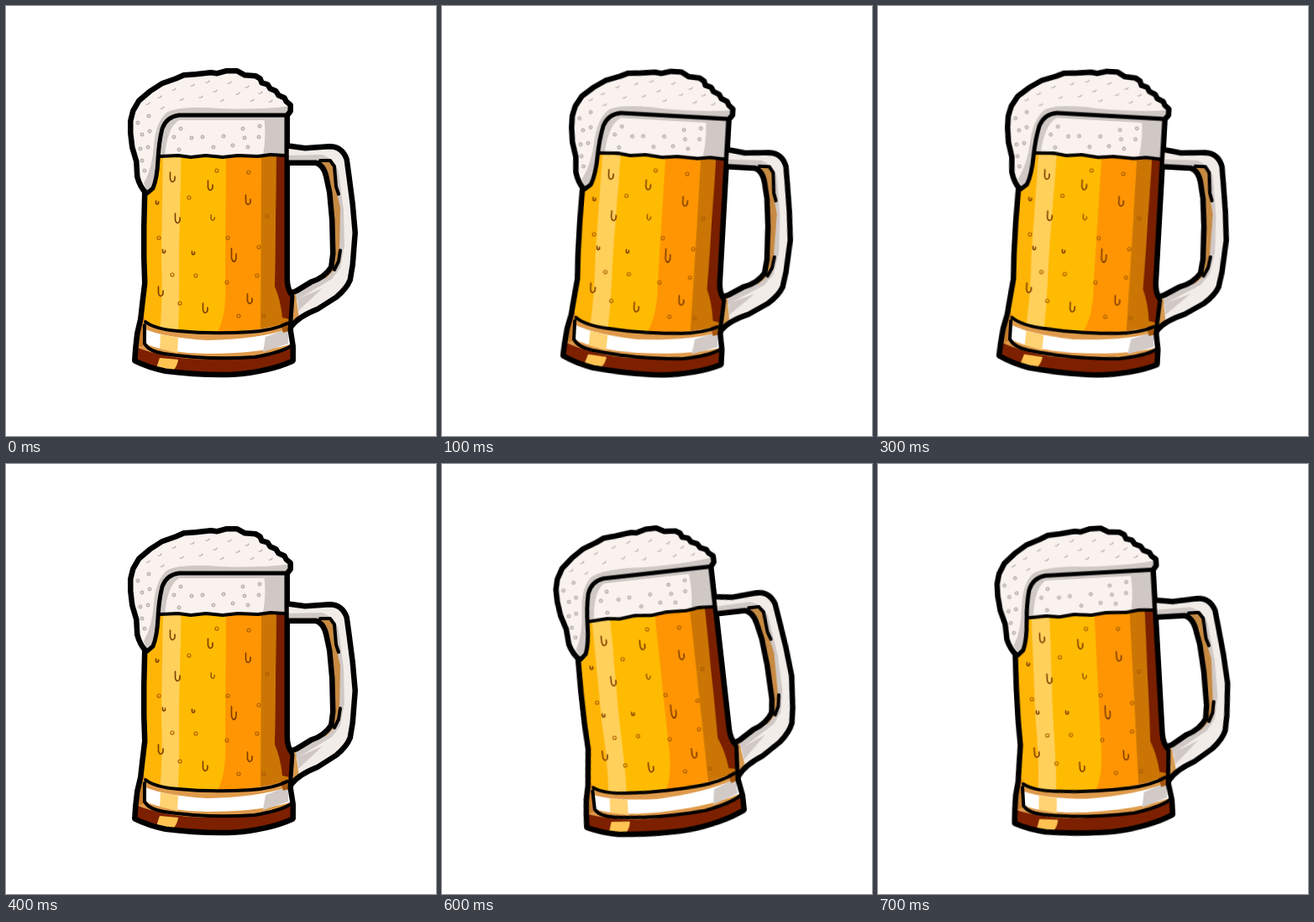
An HTML page without scripts that plays this animation: 512 px wide and 512 px high, repeating every 0.8 s.

```html
<!DOCTYPE html>
<html lang="en">
<head>
<meta charset="utf-8">
<title>Swaying beer mug</title>
<style>
html, body { margin: 0; width: 100%; height: 100%; overflow: hidden; background: #fff; }
svg { display: block; width: 100vw; height: 100vh; }
.mug { transform-origin: 256px 256px; animation: sway 800ms step-end infinite; }
@keyframes sway {
  0%, 50%, 100% { transform: rotate(0deg); }
  12.5%, 37.5% { transform: rotate(3.2deg); }
  25% { transform: rotate(6.4deg); }
  62.5%, 87.5% { transform: rotate(-3.2deg); }
  75% { transform: rotate(-6.4deg); }
}
.ink { fill: none; stroke: #000; stroke-width: 5; stroke-linejoin: round; stroke-linecap: round; }
.rim { stroke-width: 8; }
.mid { stroke-width: 4; }
.drops { fill: none; stroke: #7d3d00; stroke-width: 1.6; stroke-linecap: round; }
.specks { fill: none; stroke: #a85c00; stroke-width: 1.1; }
.bubbles { fill: #dcd5d2; stroke: #a59d9a; stroke-width: .9; }
.ticks { fill: none; stroke: #b5adaa; stroke-width: 1.2; stroke-linecap: round; }
</style>
</head>
<body>
<svg viewBox="0 0 512 512">
<defs>
  <path id="glass" d="M166 220L165 262L165 300L166 330L163 355L161 373L157 390L155 408L154 422Q170 430 190 434Q230 439 270 438Q312 435 341 422L341 405L338 386L339 374L341 346Q334 338 334 325L334 129H172V215Z"/>
  <path id="foam" d="M149 151L149 137L152 125L159 113L172 102L186 93L203 87L212 83L226 82L244 80L251 81L262 78L275 78L284 83L297 84L302 87L304 92L311 94L314 99L321 102L324 107L331 110L333 114L338 118L338 125L334 130L270 130L206 130Q191 132 186 146Q182 162 181 183Q180 205 175 217L168 223Q160 215 157 203L156 185L151 168Z"/>
  <path id="handle" d="M334 167L356 170L385 168Q400 168 405 183L408 205L412 236L415 270L412 308L409 326Q405 336 393 346L371 360Q348 369 339 381L333 345L346 340L364 329Q380 324 388 311L390 295L389 255L386 222L382 203Q379 189 369 186L334 186Z"/>
  <clipPath id="inGlass"><use href="#glass"/></clipPath>
  <clipPath id="inFoam"><use href="#foam"/></clipPath>
  <clipPath id="inHandle"><use href="#handle"/></clipPath>
  <path id="drop" d="M-2.5-6V2Q-1 7 2 4.500Q3.500 3 3-1"/>
  <path id="dot" d="M-1.500-2V1Q0 3 1.500 1V-1"/>
  <circle id="o" r="2"/>
  <path id="t" d="M-2 1Q1 2 2-1"/>
</defs>
<g class="mug">
  <g class="ink rim">
    <use href="#handle"/><use href="#glass"/><use href="#foam"/>
  </g>
  <g clip-path="url(#inHandle)">
    <use href="#handle" fill="#f2ece9"/>
    <path fill="#d0c8c5" d="M330 178L376 177Q392 182 396 198L402 243L403 285L398 312L388 325L343 352V338L388 312V222L376 186H330Z"/>
    <path fill="#c78a42" d="M372 184L391 187L394 222L398 240L397 296L391 314L380 325L389 300L386 220Z"/>
    <path fill="#d89a50" d="M334 350L345 343L349 372L335 386Z"/>
    <path fill="#d0c8c5" d="M347 349L377 336L348 363Z"/>
  </g>
  <use href="#handle" class="ink"/>
  <path class="ink mid" d="M374 184L386 184L391 191L393 215L396 224M398 291L396 304L391 314"/>

  <g clip-path="url(#inGlass)">
    <path fill="#ffb505" d="M150 120H345V440H150Z"/>
    <path fill="#ffd05a" d="M187 170H209L206 300Q207 350 205 390H183Q187 350 185 300Z"/>
    <path fill="#ffbb02" d="M209 170H263L261 330Q262 370 251 392H205Q207 350 206 300Z"/>
    <path fill="#ff9502" d="M262 170H304L303 392H250Q263 371 261 330Z"/>
    <path fill="#cb7504" d="M304 170H322L320 320Q322 345 340 360V392H303Z"/>
    <path fill="#7a2000" d="M322 170H340L342 374L329 371Q327 350 320 334Z"/>
    <path fill="#ff9a16" d="M155 350Q165 382 187 386L155 392Z"/>

    <path fill="#f9f2ef" d="M160 126H340V178L290 179L240 178L160 180Z"/>
    <path fill="#cfc8c5" d="M306 126H340V178H306Q311 150 306 126ZM170 180V130H310V136H206Q192 144 189 180Z"/>

    <path fill="#df9a4a" d="M150 372Q185 387 240 389Q300 389 345 374V412Q300 421 230 421Q180 418 150 407Z"/>
    <path fill="#fff" d="M166 385Q190 395 240 398Q300 397 338 384V403Q300 414 240 414Q190 413 166 402Z"/>
    <path fill="#ffd272" d="M184 391L205 395L204 413L183 408Z"/>
    <path fill="#d1cac7" d="M309 394L336 384V402L306 412Z"/>
    <path fill="#a5560c" d="M327 378L340 373V386L330 389Z"/>
    <path fill="#7d2000" d="M150 404Q185 420 240 421Q300 421 345 405V442H150Z"/>
    <path fill="#ffc352" d="M183 419L205 421Q204 429 199 434L179 431Z"/>
    <path fill="#c77c29" d="M154 389L163 377L165 404L155 407Z"/>
  </g>

  <g class="drops">
    <use href="#drop" x="198" y="204"/><use href="#drop" x="243" y="214"/>
    <use href="#drop" x="288" y="231"/><use href="#drop" x="204" y="253"/>
    <use href="#drop" transform="translate(246 252) scale(.75 .6)"/>
    <use href="#drop" transform="translate(271 297) scale(1 1.35)"/>
    <use href="#drop" x="184" y="340"/><use href="#drop" x="237" y="360"/>
    <use href="#drop" x="290" y="349"/><use href="#dot" x="180" y="234"/>
    <use href="#dot" x="188" y="292"/><use href="#dot" x="223" y="294"/>
  </g>
  <g class="specks">
    <use href="#o" x="251" y="196"/><use href="#o" x="289" y="198"/>
    <use href="#o" x="218" y="228"/><use href="#o" x="311" y="250"/>
    <use href="#o" x="264" y="276"/><use href="#o" x="182" y="276"/>
    <use href="#o" x="301" y="287"/><use href="#o" x="299" y="321"/>
    <use href="#o" x="263" y="329"/><use href="#o" x="226" y="321"/>
    <use href="#o" x="198" y="320"/><use href="#o" x="207" y="354"/>
    <use href="#o" x="277" y="369"/><use href="#o" x="307" y="369"/>
  </g>
  <g class="bubbles">
    <use href="#o" x="208" y="146"/><use href="#o" x="200" y="156"/>
    <use href="#o" x="221" y="157"/><use href="#o" x="206" y="171"/>
    <use href="#o" x="234" y="156"/><use href="#o" x="247" y="168"/>
    <use href="#o" x="259" y="155"/><use href="#o" x="270" y="166"/>
    <use href="#o" x="282" y="146"/><use href="#o" x="284" y="157"/>
    <use href="#o" x="301" y="156"/><use href="#o" x="288" y="168"/>
    <use href="#o" x="302" y="143"/>
  </g>

  <use href="#glass" class="ink"/>
  <path class="ink mid" d="M183 179L205 178L220 180L238 178L258 180L276 178L300 179L315 177L332 178"/>
  <path class="ink mid" d="M166 376Q178 385 205 387Q245 391 292 388Q319 386 335 378M165 380L165 402Q170 411 188 414Q240 422 296 418Q326 413 339 405"/>

  <g clip-path="url(#inFoam)">
    <use href="#foam" fill="#f9f2ef"/>
    <path fill="#cfc8c5" d="M340 119Q302 124 255 122Q207 118 191 127Q178 139 176 166Q174 194 164 211L170 225L185 190L190 150L206 132H340Z"/>
    <g class="bubbles">
      <use href="#o" x="157" y="139"/><use href="#o" x="170" y="131"/>
      <use href="#o" x="162" y="153"/><use href="#o" x="171" y="149"/>
      <use href="#o" x="160" y="170"/><use href="#o" x="169" y="168"/>
      <use href="#o" x="162" y="184"/><use href="#o" x="165" y="196"/>
    </g>
    <g class="ticks">
      <use href="#t" x="169" y="116"/><use href="#t" x="183" y="108"/>
      <use href="#t" x="186" y="121"/><use href="#t" x="200" y="99"/>
      <use href="#t" x="209" y="111"/><use href="#t" x="222" y="94"/>
      <use href="#t" x="232" y="108"/><use href="#t" x="240" y="90"/>
      <use href="#t" x="249" y="101"/><use href="#t" x="257" y="112"/>
      <use href="#t" x="266" y="91"/><use href="#t" x="276" y="104"/>
      <use href="#t" x="287" y="96"/><use href="#t" x="293" y="112"/>
      <use href="#t" x="303" y="103"/><use href="#t" x="315" y="113"/>
    </g>
  </g>
  <use href="#foam" class="ink"/>
</g>
</svg>
</body>
</html>
```
